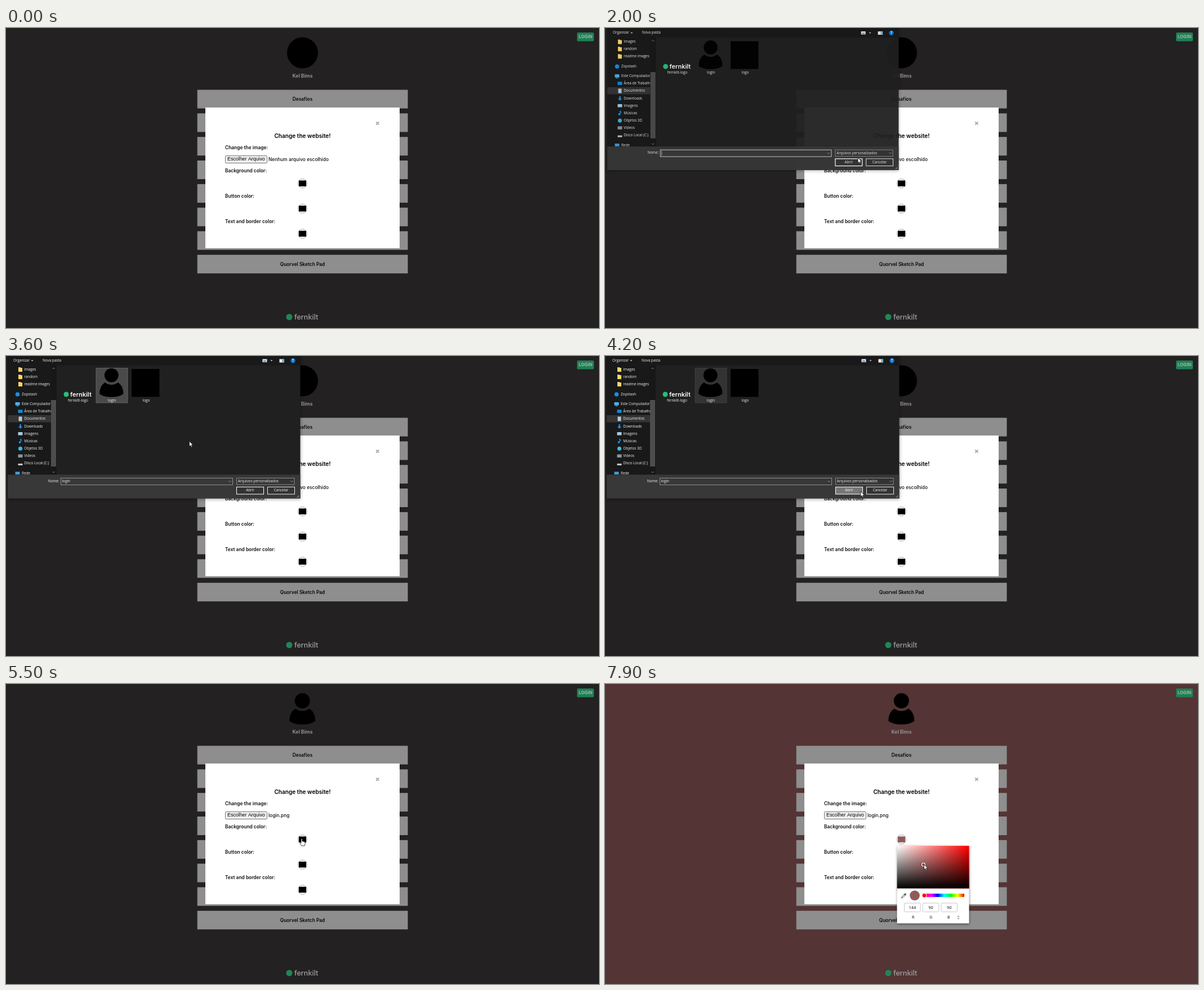
These frames come from a looping animation (1053 px wide and 532 px high, 8000 ms). An HTML page with a canvas:

```html
<!DOCTYPE html>
<html lang="pt">
<head>
<meta charset="utf-8">
<title>Change the website</title>
<style>
  html, body { margin: 0; width: 100%; height: 100%; overflow: hidden; background: #232122; }
  canvas { display: block; }
</style>
</head>
<body>
<canvas id="stage" width="1053" height="532"></canvas>
<script>
const ctx = document.getElementById('stage').getContext('2d');
const LOOP = 8000, STEP = 100;
const SITE = 'Inter, sans-serif', SYSTEM = '"Open Sans", sans-serif', UI_SIZE = 6.35;

// Pointer path: time, x, y
const POINTER = [
  [200, 29, 2], [700, 463, 250], [900, 449, 229], [1900, 449, 229], [2000, 449, 230],
  [2700, 205, 63], [2800, 199, 62], [3000, 197, 62], [3200, 197, 62], [4000, 454, 240],
  [4400, 454, 240], [4700, 487, 265], [5000, 487, 265], [5500, 525, 274], [6200, 525, 274],
  [6900, 550, 341], [7300, 550, 341], [7900, 566.5, 319.8]
];

function pointerAt(t) {
  const i = POINTER.findIndex(k => k[0] > t);
  if (i < 0) return POINTER[POINTER.length - 1].slice(1);
  if (i === 0) return null;
  const [t0, x0, y0] = POINTER[i - 1], [t1, x1, y1] = POINTER[i];
  const p = (t - t0) / (t1 - t0);
  return [x0 + (x1 - x0) * p, y0 + (y1 - y0) * p];
}

function rect(x, y, w, h, fill, stroke, line = 1) {
  if (fill) { ctx.fillStyle = fill; ctx.fillRect(x, y, w, h); }
  if (stroke) { ctx.strokeStyle = stroke; ctx.lineWidth = line; ctx.strokeRect(x, y, w, h); }
}

function paint(fill, stroke, line) {
  if (fill) { ctx.fillStyle = fill; ctx.fill(); }
  if (stroke) { ctx.strokeStyle = stroke; ctx.lineWidth = line; ctx.stroke(); }
}

function roundRect(x, y, w, h, r, fill, stroke) {
  ctx.beginPath();
  ctx.roundRect(x, y, w, h, r);
  paint(fill, stroke, 1);
}

function circle(x, y, r, fill, stroke, line = 1) {
  ctx.beginPath();
  ctx.arc(x, y, r, 0, Math.PI * 2);
  paint(fill, stroke, line);
}

function text(str, x, y, size, color, { font = SITE, weight = 400, align = 'left' } = {}) {
  ctx.font = `${weight} ${size}px ${font}`;
  ctx.fillStyle = color;
  ctx.textAlign = align;
  ctx.textBaseline = 'middle';
  ctx.fillText(str, x, y);
}

function uiText(str, x, y, align = 'left') {
  text(str, x, y, UI_SIZE, '#f4f4f4', { font: SYSTEM, align });
}

function shape(x, y, d, fill, stroke, line = 1, scale = 1) {
  const path = new Path2D(d);
  ctx.save();
  ctx.translate(x, y);
  ctx.scale(scale, scale);
  ctx.lineWidth = line;
  ctx.lineJoin = 'round';
  if (fill) { ctx.fillStyle = fill; ctx.fill(path); }
  if (stroke) { ctx.strokeStyle = stroke; ctx.stroke(path); }
  ctx.restore();
}

function chevron(x, y, up) {
  shape(x, y, up ? 'M-2 1L0-1 2 1' : 'M-2-1L0 1 2-1', null, '#aaa', 0.8);
}

function person(x, y, scale) {
  circle(x, y - 14 * scale, 13.5 * scale, '#000');
  shape(x, y, 'M-12.5 0Q0 8.5 12.5 0C19 4 23 11 23 22Q15 28 0 28Q-15 28-23 22C-23 11-19 4-12.5 0Z',
    '#000', null, 1, scale);
}

function page(t, color) {
  const dimmed = color.map(c => Math.round(c * 0.58));
  rect(0, 0, 1053, 532, t < 7300 ? '#232122' : `rgb(${dimmed})`);
  if (t < 4700) circle(526.5, 44, 27.5, '#000');
  else person(526.3, 43.7, 1);
  text('Kel Bims', 526.5, 85, 8.6, '#929192', { weight: 700, align: 'center' });
  roundRect(1014, 8, 30, 15.5, 2, '#1f8055');
  text('LOGIN', 1029, 16, 7.8, '#a5b5ad', { weight: 700, align: 'center' });
  for (let i = 0; i < 8; i++) rect(339.7, 109.6 + i * 41.8, 373.8, 33, '#8e8e8e');
  const label = { weight: 600, align: 'center' };
  text('Desafios', 526.5, 126.5, 8.4, '#080808', label);
  text('Quorvel Sketch Pad', 526.5, 419.5, 8.4, '#080808', label);
  circle(503, 512.5, 5.5, '#208657');
  text('fernkilt', 512, 513, 12.6, '#a0a0a0', { weight: 500 });
}

function modal(t, color) {
  const picked = t >= 4700, hover = t >= 800 && t < 1900;
  rect(354, 141, 345, 249.5, '#fff');
  shape(659.8, 169, 'M-2.5-2.5L2.5 2.5M2.5-2.5L-2.5 2.5', null, '#aaa', 1.8);
  text('Change the website!', 526.5, 192, 10.1, '#000', { weight: 600, align: 'center' });
  text('Change the image:', 389, 212.5, 8.4, '#111', { weight: 600 });
  roundRect(389.5, 226.5, 74, 13, 1, hover ? '#e1e1e1' : '#efefef', hover ? '#4a4a4a' : '#767676');
  text('Escolher Arquivo', 426.5, 232.8, 8.9, '#000',
    { font: '"Liberation Sans", Arial, sans-serif', align: 'center' });
  text(picked ? 'login.png' : 'Nenhum arquivo escolhido', 466, 233, 8.4, '#111', { weight: 500 });
  ['Background color:', 'Button color:', 'Text and border color:'].forEach((name, i) => {
    const y = 253.8 + i * 44.6;
    text(name, 389, y, 8.4, '#111', { weight: 600 });
    circle(526.5, y + 21.8, 8, '#fff', '#777', 0.7);
    rect(520, y + 16.6, 13, 10.4, i ? '#000' : `rgb(${color})`);
  });
}

function sidebar() {
  const items = [
    ['images', 24, '#ffd766'], ['random', 37, '#ffd766'], ['readme images', 50, '#ffd766'],
    ['Zopstash', 68, '#1490df'], ['Este Computador', 85, '#4db4ee'],
    ['Área de Trabalho', 98.3, '#0a8fe0'], ['Documentos', 111.5, '#b5c8d4'],
    ['Downloads', 125, '#1a8ae5'], ['Imagens', 138, '#a5cbe5'], ['Músicas', 151, '#1a9fff'],
    ['Objetos 3D', 164.3, '#38b8dc'], ['Vídeos', 177.5, '#8b95a3'],
    ['Disco Local (C:)', 190.8, '#c8ced2'], ['Rede', 208.3, '#3f9fe0']
  ];
  ctx.save();
  ctx.beginPath();
  ctx.rect(3, 16, 77, 194);
  ctx.clip();
  rect(3, 105, 77, 12.5, '#353535');
  for (const [name, y, color] of items) {
    const root = ['Zopstash', 'Este Computador', 'Rede'].includes(name);
    const x = root ? 20.5 : 25.5;
    if (name === 'Zopstash') circle(x, y, 3.8, color);
    else if (name === 'Downloads') shape(x, y, 'M-1.3-4H1.3V0H3.8L0 4-3.8 0H-1.3Z', color);
    else if (name === 'Músicas') {
      circle(x - 1, y + 2, 1.8, color);
      shape(x, y, 'M.5 2V-4Q1 -2 3-1', null, color, 1.1);
    } else if (name === 'Objetos 3D') shape(x, y, 'M0-4L3.5-2V2L0 4-3.5 2V-2Z', color);
    else if (name === 'Documentos') rect(x - 3, y - 4, 6, 8, color);
    else if (color === '#ffd766') shape(x, y, 'M-3.5-4H0L1-3H3.5V4H-3.5Z', color);
    else if (name === 'Disco Local (C:)') rect(x - 4, y, 8, 3, color);
    else {
      rect(x - 4, y - 3, 8, 5.5, color);
      if (root) rect(x - 2, y + 3.2, 4, 1, color);
    }
    uiText(name, root ? 28 : 32.3, y);
  }
  ctx.restore();
  rect(80, 16, 9.5, 194, '#171717');
  rect(80, 78, 9, 118, '#4d4d4d');
  chevron(84.5, 22, true);
  chevron(84.5, 206, false);
}

function files(t) {
  if (t >= 3200) {
    const fill = t < 3400 ? '#777' : t < 4200 ? '#4a4a4a' : '#333';
    rect(160, 21.5, 56, 61.5, fill, t < 4200 ? '#777' : '#484848', 0.7);
  } else if (t >= 2700) rect(159.5, 21, 57.5, 62.5, '#4d4d4d');
  circle(107, 68, 4.5, '#25c07a');
  text('fernkilt', 114, 68.3, 11, '#fff', { weight: 600 });
  person(187.3, 47, 0.92);
  rect(223, 23, 49.5, 49.5, '#000');
  uiText('fernkilt-logo', 128, 79, 'center');
  uiText('login', 188, 79, 'center');
  uiText('logo', 249, 79, 'center');
}

function dialog(t) {
  const opening = Math.min(1, (t - 1880) / 150);
  const show = t >= 4400 ? Math.max(0, 1 - (t - 4350) / 150) : 1 - (1 - opening) ** 2;
  if (t < 1900 || show <= 0) return;
  const scale = 0.9 + 0.1 * show;
  ctx.save();
  ctx.globalAlpha = show ** 2;
  ctx.translate(263, 126);
  ctx.scale(scale, scale);
  ctx.translate(-263, -126);
  ctx.shadowColor = 'rgba(0,0,0,.35)';
  ctx.shadowBlur = 6;
  ctx.shadowOffsetY = 1;
  rect(3, -20, 519.5, 272.5, '#202020');
  ctx.shadowColor = 'transparent';
  rect(3, -20, 519.5, 36.5, '#191919');
  rect(3, 16.5, 87, 194, '#191919');

  uiText('Organizar', 13, 8.3);
  shape(46.5, 8.3, 'M-2-1H2L0 1.3Z', '#ccc');
  uiText('Nova pasta', 65, 8.3);
  rect(455.5, 5.5, 8, 5.5, '#e4eef4');
  rect(457, 8, 5, 2, '#3b82b5');
  shape(471.5, 8.3, 'M-2-1H2L0 1.3Z', '#ccc');
  rect(485.5, 5.5, 8.5, 6, '#eee');
  rect(490.5, 6, 3, 5, '#4aa3df');
  circle(509.5, 8.3, 4.2, '#0a78d0');
  text('?', 509.5, 8.5, 6.5, '#fff', { font: SYSTEM, weight: 700, align: 'center' });
  sidebar();
  files(t);

  rect(3, 210.5, 519.5, 42, '#383838');
  uiText('Nome:', 94.5, 222, 'right');
  const chosen = t >= 3200;
  rect(97.5, 216.5, 305, 12, '#383838', chosen ? '#9a9a9a' : '#e0e0e0', 0.9);
  if (chosen) uiText('login', 99.5, 222.7);
  else rect(99.8, 218.5, 0.7, 8, '#ddd');
  chevron(397.5, 222.5);
  rect(409.5, 216.5, 102.5, 11.5, '#333', '#8a8a8a');
  uiText('Arquivos personalizados', 411.8, 222.3);
  chevron(507.5, 222.3);
  const hover = t >= 4200 ? '#777' : t >= 4000 ? '#5a5a5a' : '#333';
  rect(409.5, 232.3, 48, 12.7, hover, '#fff', chosen ? 1 : 1.3);
  uiText('Abrir', 433.5, 238.7, 'center');
  rect(464.5, 232.3, 48, 12.7, '#333', '#e8e8e8');
  uiText('Cancelar', 488.5, 238.7, 'center');
  shape(520.5, 251, 'M-4 0L0-4M-2 0L0-2', null, '#aaa', 0.8);
  ctx.restore();
}

function gradient(x0, y0, x1, y1, colors) {
  const g = ctx.createLinearGradient(x0, y0, x1, y1);
  colors.forEach((c, i) => g.addColorStop(i / (colors.length - 1), c));
  return g;
}

function picker(t, color, pointer) {
  if (t < 6100) return;
  ctx.save();
  ctx.shadowColor = 'rgba(0,0,0,.5)';
  ctx.shadowBlur = 4;
  ctx.shadowOffsetY = 1;
  rect(518.5, 286.8, 128, 137.7, '#fff');
  ctx.restore();
  rect(518.5, 287, 128, 75.5, gradient(518.5, 0, 646.5, 0, ['#fff', '#f00']));
  rect(518.5, 287, 128, 75.5, gradient(0, 287, 0, 362.5, ['rgba(0,0,0,0)', '#000']));
  const [x, y] = t < 7300 ? [518.5, 362.5] : pointer;
  ctx.save();
  ctx.beginPath();
  ctx.rect(518.5, 287, 128, 137);
  ctx.clip();
  circle(x - 1, y + 0.5, 4, null, '#000', 0.7);
  circle(x - 1, y + 0.5, 3.2, `rgb(${color})`, '#fff', 1.2);
  ctx.restore();

  shape(530.5, 375.5, 'M-4 4L-3 1.5 1-2.5 2.5-1-1.5 3ZM0-3.5L3.5 0', null, '#333', 0.9);
  shape(530.5, 375.5, 'M1-2.5L3-4.5 4.5-3 2.5-1Z', '#333');
  circle(550, 375, 8.8, `rgb(${color})`);
  roundRect(563, 371.8, 75, 6, 1,
    gradient(567, 0, 638, 0, ['#f00', '#f0f', '#00f', '#0ff', '#0f0', '#ff0', '#f00']));
  circle(567, 375, 4, '#f00', '#fff', 1);
  const style = { font: 'Roboto, sans-serif', align: 'center' };
  ['R', 'G', 'B'].forEach((name, i) => {
    const left = 531.5 + i * 32.7;
    roundRect(left, 388.5, 28.5, 15.5, 1.5, '#fff', '#c8c8c8');
    text(color[i], left + 14.3, 396.7, 7.6, '#222', style);
    text(name, 547.3 + i * 31.5, 414.3, 7.2, '#222', style);
  });
  shape(627.5, 414, 'M-1.5-1L0-2.6 1.5-1M-1.5 1L0 2.6 1.5 1', null, '#333', 0.9);
}

function drawPointer(t, pos) {
  if (!pos) return;
  const hand = 'M-1 1Q0-.5 1 1V5Q2 4 2.8 5.3 4 4.5 4.5 5.8 6 5.5 6 7V9.5Q6 11 5 13H0L-3.2 8.5Q-3 6.9-1 8Z';
  const arrow = 'M0 0V9.5L2.2 7.5 3.7 11 5.2 10.3 3.7 7H6.7Z';
  shape(...pos, t >= 5400 && t < 6300 ? hand : arrow, '#fff', '#111', 0.8);
}

function pickedColor(t, pointer) {
  if (t < 7300) return [0, 0, 0];
  const [x, y] = pointer;
  const saturation = (x - 518.5) / 128, value = 255 * (1 - (y - 287) / 75.5);
  const low = Math.round(value * (1 - saturation));
  return [Math.round(value), low, low];
}

function frame() {
  const t = Math.floor(performance.now() % LOOP / STEP) * STEP;
  const pointer = pointerAt(t);
  const color = pickedColor(t, pointer);
  page(t, color);
  modal(t, color);
  dialog(t);
  picker(t, color, pointer);
  drawPointer(t, pointer);
  requestAnimationFrame(frame);
}
requestAnimationFrame(frame);
</script>
</body>
</html>
```
